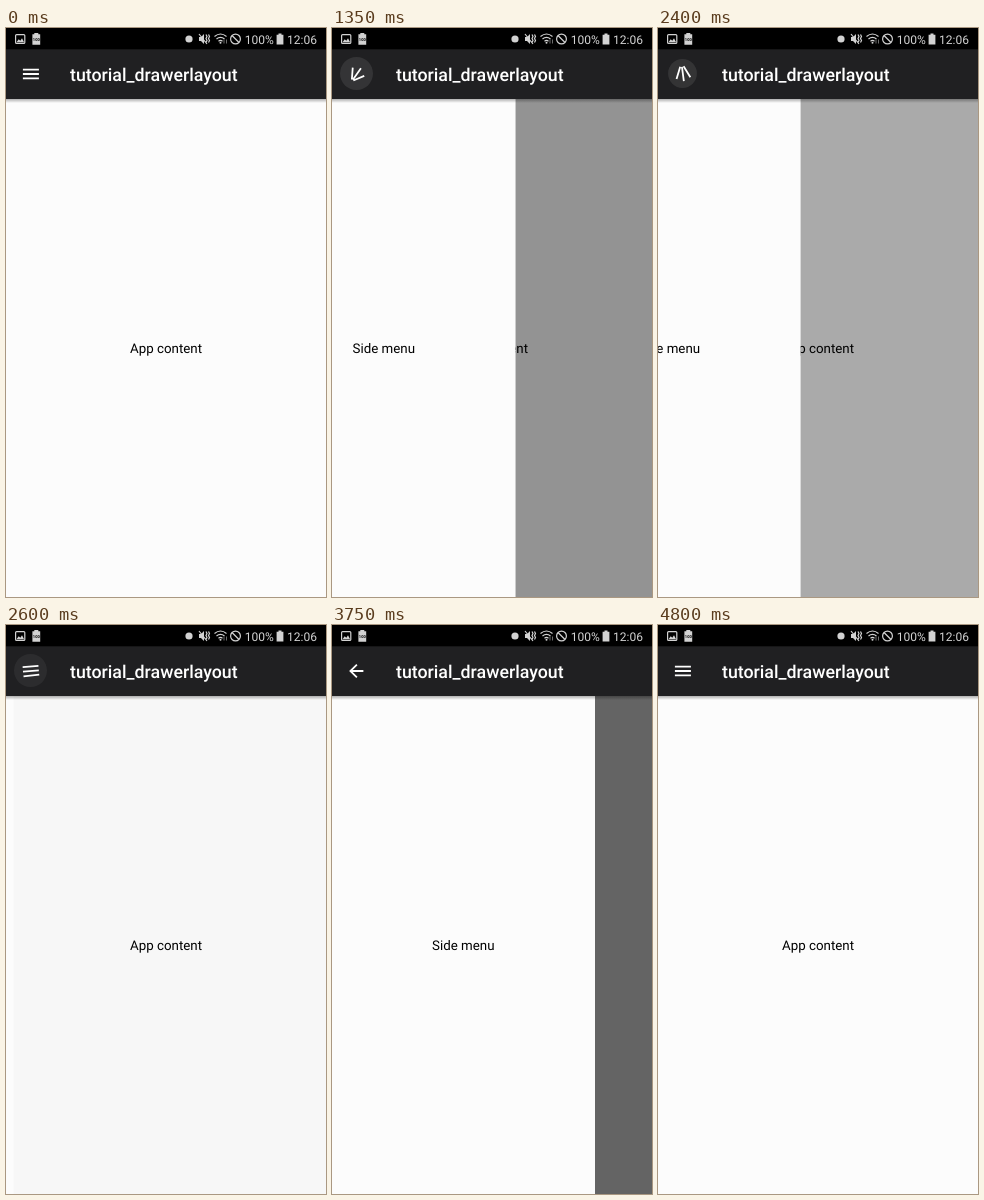
These frames come from a looping animation (320x569 px, 4.85 s). An HTML page:

```html
<!DOCTYPE html>
<html lang="en">
<head>
<meta charset="utf-8">
<title>Drawer layout</title>
<style>
  html, body { margin: 0; width: 100%; height: 100%; overflow: hidden; background: #fcfcfc; }
  svg { display: block; width: 100vw; height: 100vh; }
  text { font-family: Roboto, "Noto Sans", sans-serif; text-rendering: geometricPrecision; }
  .label { font-size: 13.33px; text-anchor: middle; fill: #000; }
  .title { font-size: 17.78px; font-weight: 500; fill: #fff; }
  .status { font-size: 12px; fill: #d2d2d2; }
  .line { fill: none; stroke: #d2d2d2; stroke-width: 1.2; }
</style>
</head>
<body>
<svg viewBox="0 0 320 569" preserveAspectRatio="none">
  <defs>
    <linearGradient id="shade" x2="0" y2="1">
      <stop offset="0" stop-opacity=".3"/>
      <stop offset="1" stop-opacity="0"/>
    </linearGradient>
    <radialGradient id="spot">
      <stop offset="0" stop-color="#fff" stop-opacity=".78"/>
      <stop offset=".55" stop-color="#fff" stop-opacity=".68"/>
      <stop offset="1" stop-color="#fff" stop-opacity=".42"/>
    </radialGradient>
  </defs>

  <rect y="71" width="320" height="498" fill="#fcfcfc"/>
  <rect id="scrim" y="71" width="320" height="498"/>
  <text class="label" x="160" y="324.6">App content</text>

  <g id="drawer">
    <rect y="71" width="263" height="498" fill="#fcfcfc"/>
    <text class="label" x="131.3" y="324.6">Side menu</text>
  </g>

  <rect y="71" width="320" height="4" fill="url(#shade)"/>
  <rect y="21" width="320" height="50" fill="#202022"/>
  <rect width="320" height="21.3" fill="#000"/>
  <text class="title" x="64" y="52.5">tutorial_drawerlayout</text>

  <circle id="ripple" cx="24.5" cy="45.5" r="16.5" fill="#fff"/>
  <path id="icon" fill="none" stroke="#fff" stroke-width="1.78"/>

  <g fill="#d2d2d2">
    <rect class="line" x="9.6" y="6.6" width="9.2" height="8.8" rx="1"/>
    <path d="M10.5 14.2l2.2-3 1.6 1.5 1.700-2.500 2.100 4z"/>
    <path d="M28.300 5h4v1.300h1.900v10.400h-7.800V6.300h1.900z"/>
    <text x="30.300" y="13" font-size="4" font-weight="700" text-anchor="middle" fill="#000">100</text>
    <circle cx="183" cy="11" r="3.600"/>
    <path d="M193 9h2l3-3v10l-3-3h-2z"/>
    <path class="line" d="M193 6l8 10M200 6.500l1 2-1 2 1 2-1 2M202.500 6.500l1 2-1 2 1 2-1 2"/>
    <path class="line" d="M208.500 8.500q6-5 12 0M210.500 11q4-3.300 8 0M212.500 13.200q2-1.600 4 0"/>
    <circle cx="214.500" cy="14.800" r="1"/>
    <path d="M218 11.500v4M220.500 11.500v4" stroke="#6c6c6c"/>
    <circle class="line" cx="229.500" cy="11" r="4.900"/>
    <path class="line" d="M226 7.500l7 7"/>
    <path d="M272.500 5.500h3v1.200h1.900v9.800h-6.800V6.700h1.900z"/>
  </g>
  <text class="status" x="238.700" y="15.500">100%</text>
  <text class="status" x="281" y="15.500">12:06</text>

  <circle id="touch" r="9.900" fill="url(#spot)" stroke="#777" stroke-opacity=".6"/>
</svg>
<script>
const LOOP = 4850, DRAWER = 263, SETTLE = 512;
const TAP_HOLD = 100, SETTLE_DELAY = 92;
const SWIPE = { start: 4000, release: 4450, end: 4850, rest: 51, grip: 40, y: 341 };
const TAPS = [
  { at: 1150, open: true, x: 16, y: 38, fadeEnd: 490 },
  { at: 2250, open: false, x: 21, y: 45, fadeEnd: 595 },
  { at: 3200, open: true, x: 21, y: 45, fadeEnd: 545 }
];

const el = id => document.getElementById(id);
const clamp = v => Math.min(1, Math.max(0, v));
const lerp = (a, b, k) => a + (b - a) * k;
const easeOut = k => 1 - (1 - clamp(k)) ** 5;
const smooth = k => k * k * (3 - 2 * k);

function drawerWidth(t) {
  if (t >= SWIPE.release) {
    const k = (t - SWIPE.release) / (SWIPE.end - SWIPE.release);
    return SWIPE.rest * (1 - easeOut(k));
  }
  if (t >= SWIPE.start) {
    const k = (t - SWIPE.start) / (SWIPE.release - SWIPE.start);
    return lerp(DRAWER, SWIPE.rest, smooth(k));
  }
  const tap = TAPS.findLast(({ at }) => t >= at);
  if (!tap) return 0;
  const k = easeOut((t - tap.at - SETTLE_DELAY) / SETTLE);
  return DRAWER * (tap.open ? k : 1 - k);
}

// Three bars turn into a back arrow, always spinning clockwise.
function drawIcon(p, closing) {
  const scale = 320 / 360;
  const angle = lerp(0, Math.PI / 4, p);
  const bar = lerp(18, Math.sqrt(128), p) * scale;
  const shaft = lerp(18, 16, p) * scale;
  const gap = lerp(5, -0.7, p) * scale;
  const cut = 0.7 * p * scale;
  const dx = bar * Math.cos(angle), dy = bar * Math.sin(angle);
  const left = -shaft / 2;
  const spin = (closing ? 180 : -180) * (1 - p);
  el("icon").setAttribute("d",
    `M${left + cut} 0h${shaft - 2 * cut}` +
    `M${left} ${gap}l${dx} ${dy}M${left} ${-gap}l${dx} ${-dy}`);
  el("icon").setAttribute("transform", `translate(24.9 46) rotate(${spin})`);
}

function drawTouch(t, width) {
  const tap = TAPS.find(({ at }) => t >= at && t < at + TAP_HOLD);
  const swiping = t >= SWIPE.start && t < SWIPE.release;
  const spot = tap || { x: width - SWIPE.grip, y: SWIPE.y };
  el("touch").setAttribute("visibility", tap || swiping ? "visible" : "hidden");
  el("touch").setAttribute("transform", `translate(${spot.x} ${spot.y})`);
}

function drawRipple(t) {
  const tap = TAPS.findLast(({ at }) => t >= at);
  const age = tap ? t - tap.at : 0;
  const fade = tap ? clamp((tap.fadeEnd - age) / (tap.fadeEnd - 200)) : 0;
  el("ripple").setAttribute("opacity", 0.09 * clamp(age / 120) * fade);
  el("ripple").setAttribute("r", lerp(8, 16.5, clamp(age / 200)));
}

function render(t) {
  const width = drawerWidth(t);
  const p = width / DRAWER;
  el("scrim").setAttribute("opacity", 0.6 * p);
  el("drawer").setAttribute("transform", `translate(${width - DRAWER} 0)`);
  const closing = t >= SWIPE.start || (t >= TAPS[1].at && t < TAPS[2].at);
  drawIcon(p, closing);
  drawRipple(t);
  drawTouch(t, width);
}

const begin = performance.now();
function tick() {
  render((performance.now() - begin) % LOOP);
  requestAnimationFrame(tick);
}
tick();
</script>
</body>
</html>
```
